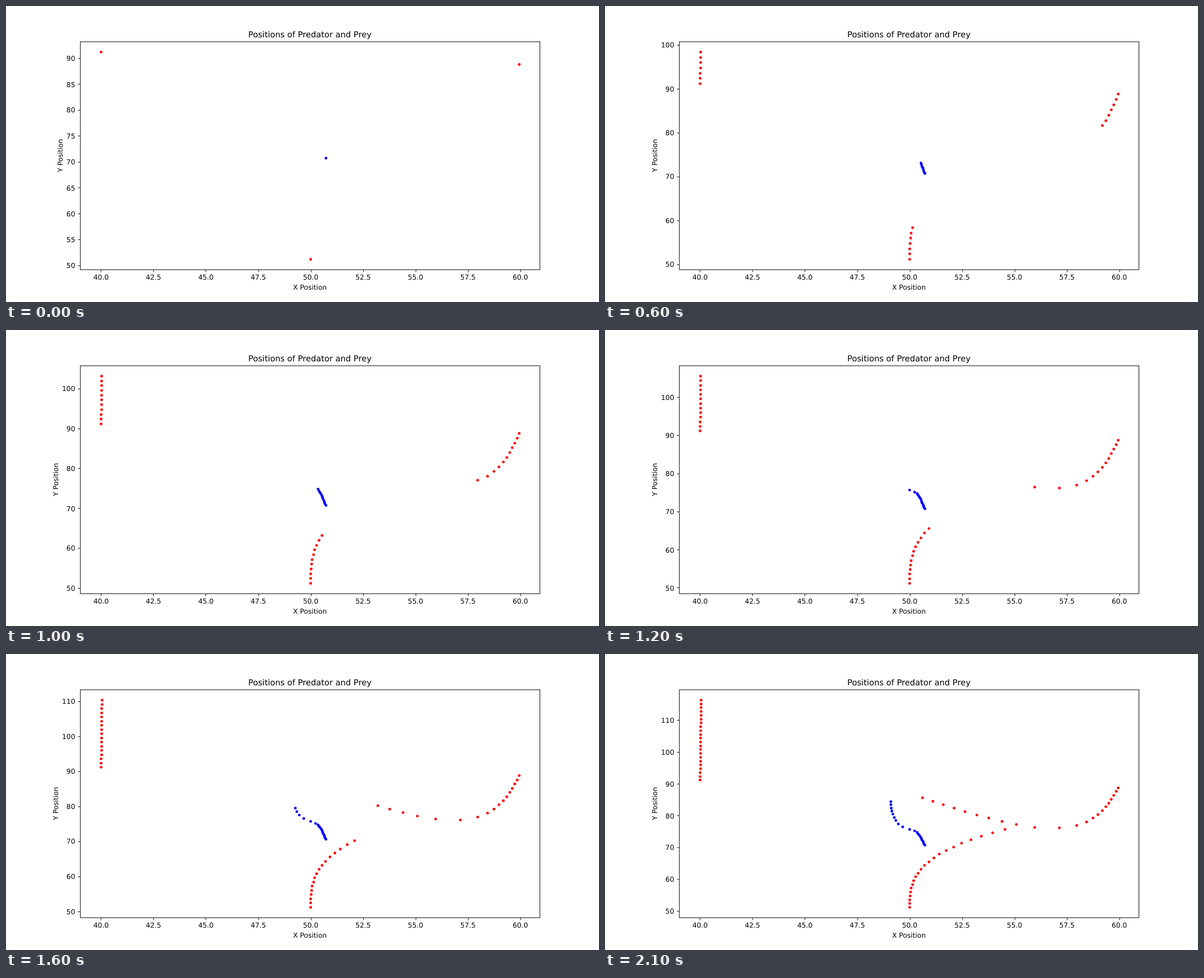
Recreate the animation shown at these times as an HTML page. Size 1058 px wide and 529 px high, loop 2.2 s.

```html
<!DOCTYPE html>
<html lang="en">
<head>
<meta charset="utf-8">
<title>Positions of Predator and Prey</title>
<style>
  html, body { margin: 0; width: 100%; height: 100%; overflow: hidden; background: #fff; }
  svg { display: block; width: 100vw; height: 100vh; }
  text {
    font: 13.89px "DejaVu Sans", sans-serif;
    text-anchor: middle;
    text-rendering: geometricPrecision;
  }
  .title { font-size: 16.67px; }
  .y-tick { text-anchor: end; }
  .line { fill: none; stroke: #000; stroke-width: 1.11; }
</style>
</head>
<body>
<svg viewBox="0 0 1200 600">
  <text class="title" x="615" y="64">Positions of Predator and Prey</text>
  <text x="615" y="574.5">X Position</text>
  <text id="y-label">Y Position</text>
  <g id="x-axis"></g>
  <g id="y-axis"></g>
  <g id="dots"></g>
  <rect class="line" x="150.5" y="72.5" width="930" height="462"/>
</svg>
<script>
const STEP_MS = 100, STEPS = 22;
const TICK = 4.86, START_Y = 51.2, PREDATOR_SPEED = 1.2;
const byId = id => document.getElementById(id);
const snap = v => Math.floor(v + 0.5) + 0.5;
const toX = x => 192.35 + (x - 40) * 42.42;
const radians = degrees => degrees * Math.PI / 180;

function add(parent, tag, attrs, text = "") {
  const node = document.createElementNS("http://www.w3.org/2000/svg", tag);
  for (const key in attrs) node.setAttribute(key, attrs[key]);
  node.textContent = text;
  parent.append(node);
  return node;
}

// Walks from a start point; headings are in degrees clockwise from straight up.
function walk(x, y, heading, speed = () => PREDATOR_SPEED) {
  const points = [[x, y]];
  for (let n = 1; n < STEPS; n++) {
    const angle = radians(heading(n));
    x += speed(n) * Math.sin(angle);
    y += speed(n) * Math.cos(angle);
    points.push([x, y]);
  }
  return points;
}

const RED = "#f00", BLUE = "#00f";
const series = [
  // Almost straight up.
  [walk(39.998, 91.2, () => 0.094), RED],
  // Bends right at a steadily growing rate.
  [walk(49.99, START_Y, n => 0.067 * n * n), RED],
  // Comes down, swings past the prey and leaves upwards.
  [walk(59.93, 88.8, n => 260.5 + 0.881 * Math.atan((n - 11.65) / 0.75) * 180 / Math.PI), RED],
  // Drifts up, then swerves left and speeds up when the predator is near.
  [walk(50.71, 70.71,
    n => 0.2 * n - 4.4 - 24 / (1 + ((n - 12.3) / 1.5) ** 2),
    n => 0.705 + 0.295 * Math.tanh((n - 12.45) / 0.67)), BLUE]
];

const dots = series.flatMap(([points, fill]) => points.map(([x, y], i) => ({
  y, i, node: add(byId("dots"), "circle", { cx: snap(toX(x)), r: 2.78, fill })
})));

for (let x = 40; x <= 60; x += 2.5) {
  const px = toX(x);
  add(byId("x-axis"), "path", { class: "line", d: `M${snap(px)} 534.5v${TICK}` });
  add(byId("x-axis"), "text", { x: px, y: 555 }, x.toFixed(1));
}

function draw(step) {
  const span = 40 + PREDATOR_SPEED * step;
  const toY = y => 513 - (y - START_Y) * 420 / span;
  const top = START_Y + span * 1.05;
  const gap = span * 1.1 <= 45 ? 5 : 10;

  const axis = byId("y-axis");
  axis.replaceChildren();
  for (let y = 50; y <= top; y += gap) {
    const py = toY(y);
    add(axis, "path", { class: "line", d: `M150.5 ${snap(py)}h${-TICK}` });
    add(axis, "text", { class: "y-tick", x: 140, y: Math.round(py + 5.5) }, y);
  }

  const labelX = top >= 100 ? 105 : 114;
  byId("y-label").setAttribute("transform", `translate(${labelX} 303) rotate(-90)`);

  for (const { y, i, node } of dots) {
    node.setAttribute("cy", snap(toY(y)));
    node.setAttribute("visibility", i <= step ? "visible" : "hidden");
  }
}

let shown = -1;
function tick() {
  const step = Math.floor(performance.now() / STEP_MS) % STEPS;
  if (step !== shown) draw(shown = step);
  requestAnimationFrame(tick);
}
tick();
</script>
</body>
</html>
```
